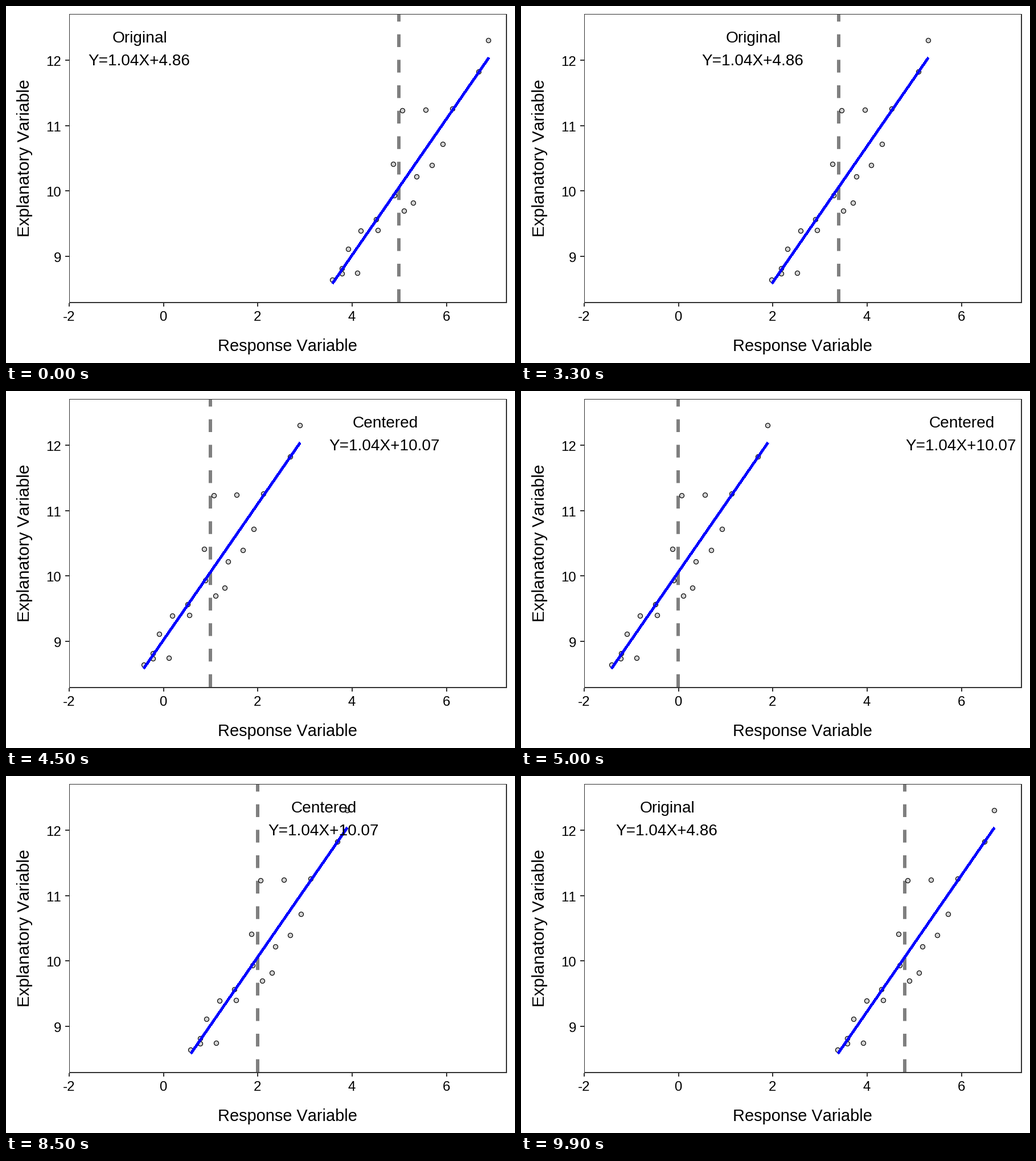
Recreate the animation shown at these times as a matplotlib script. Size 894 by 626 pixels, loop 10 s.

```python
import numpy as np
import matplotlib.pyplot as plt
from matplotlib.animation import FuncAnimation
from matplotlib.patches import Rectangle

W, H, DPI = 894, 626, 100
PT = 72 / DPI                      # points per pixel
LEFT, RIGHT, TOP, BOTTOM = 111, 878, 14, 519
DARK = "#333333"

STEPS, REST = 25, 25               # frames moving and resting per half
MEAN, SLOPE, LEVEL = 5, 1.0425, 10.068

plt.rcParams["font.family"] = "Liberation Sans"
plt.rcParams["text.kerning_factor"] = 6    # no pair kerning


def px(x):
    return 276.6 + 82.87 * x


def py(y):
    return 95.7 + 114.6 * (12 - y)


def line(x):
    return LEVEL + SLOPE * x


def sample():
    """Centered observations: pairs that spread apart away from the mean."""
    mid = np.array([-1.315, -1.15, -.845, -.47, -.115,
                    .085, .338, .627, 1.025, 1.792])
    gap = np.minimum(.205, .024 + .012 * (np.arange(10) - 4) ** 2)
    x = np.column_stack([mid - gap / 2, mid + gap / 2]).ravel()
    noise = np.array([.06, .02, -.06, .18, -.4, .17, .01, -.19, .48, -.02,
                      1.1, -.47, -.56, -.23, .59, -.39, -.31, .02, 0, .27])
    return x, line(x) + noise


fig = plt.figure(figsize=(W / DPI, H / DPI), dpi=DPI, facecolor="white")
ax = fig.add_axes([0, 0, 1, 1])
ax.set_xlim(0, W)
ax.set_ylim(H, 0)
ax.axis("off")


def bar(x, y, w, h):
    ax.add_patch(Rectangle((x, y), w, h, fc=DARK, lw=0,
                           antialiased=False, zorder=5))


def put(x, y, s, size, ha="center", **kw):
    return ax.text(x, y, s, fontsize=size * PT, ha=ha, va="baseline",
                   color="black", zorder=4, **kw)


# panel border
bar(LEFT, TOP, RIGHT + 2 - LEFT, 1)
bar(LEFT, TOP, 1, BOTTOM + 2 - TOP)
bar(RIGHT, TOP, 2, BOTTOM + 2 - TOP)
bar(LEFT, BOTTOM, RIGHT + 2 - LEFT, 2)

# ticks, tick labels and axis titles
for v in range(-2, 7, 2):
    bar(round(px(v)) - 1, BOTTOM + 2, 2, 6)
    put(px(v) - .5, 552, str(v), 24)
for v in range(9, 13):
    bar(LEFT - 7, int(py(v)) - 1, 7, 2)
    put(97, py(v) + 9.3, str(v), 24, ha="right")
put(494, 605, "Response Variable", 29)
put(41, 267, "Explanatory Variable", 30, rotation=90, rotation_mode="anchor")

# moving parts
xs, ys = sample()
ends = xs[[0, -1]]
dash = 22.35 / 6
mean_line, = ax.plot([], [], color="#7f7f7f", lw=6 * PT,
                     ls=(0, (dash, dash)), dash_capstyle="butt", zorder=1)
dots, = ax.plot([], [], "o", ms=8 * PT, mfc="#d3d3d3", mec="black",
                mew=1.2 * PT, zorder=2)
fit, = ax.plot([], [], color="#0000ff", lw=3.6 * PT, antialiased=False,
               solid_capstyle="butt", zorder=3)
head = put(0, 64, "", 28)
equation = put(0, 104, "", 28)


def draw(i):
    there = np.clip(i - REST, 0, STEPS)
    back = np.clip(i - 2 * REST - STEPS, 0, STEPS)
    p = (there - back) / STEPS     # 0 raw, 1 centered
    mean = MEAN * (1 - p)

    x = px(mean) - .5
    mean_line.set_data([x, x], [BOTTOM, TOP + 1])
    dots.set_data(px(mean + xs) - .5, py(ys))
    fit.set_data(px(mean + ends), py(line(ends)))

    centered = p > .5
    label_x = px(-.5 + 6.5 * p)
    head.set_text("Centered" if centered else "Original")
    head.set_x(label_x)
    equation.set_text("Y=1.04X+10.07" if centered else "Y=1.04X+4.86")
    equation.set_x(label_x - 1)
    return mean_line, dots, fit, head, equation


anim = FuncAnimation(fig, draw, frames=2 * (STEPS + REST), interval=100,
                     init_func=lambda: draw(0), repeat=True, repeat_delay=0)
plt.show()
```
